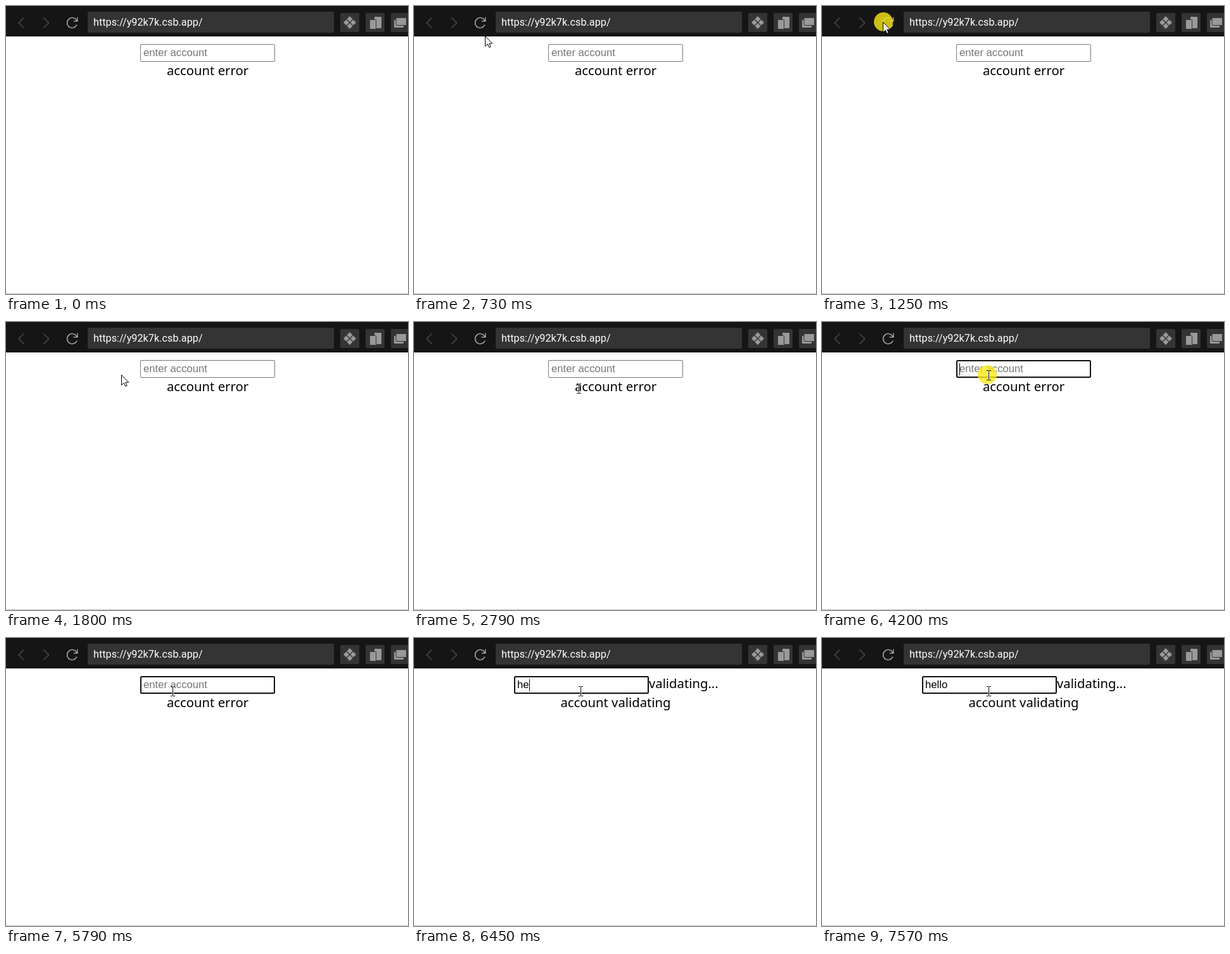
These frames come from a looping animation (635 by 454 pixels, 8 s). An HTML page:

```html
<!DOCTYPE html>
<html lang="en">
<head>
<meta charset="utf-8">
<title>Account validation</title>
<style>
  html, body { margin: 0; width: 100%; height: 100%; overflow: hidden; background: #fff; }
  svg { display: block; }
  .label { font: 20.25px "Noto Sans", sans-serif; }
  .field { font: 16.667px "Liberation Sans", Arial, sans-serif; }
  .url { font: 16.25px Roboto, sans-serif; fill: #fff; }
  .line { fill: none; stroke-width: 1.3; }
</style>
</head>
<body>
<svg width="635" height="454" viewBox="0 0 635 454">
  <rect width="635" height="454" fill="#fff"/>

  <g id="page">
    <g id="input">
      <rect id="border" fill="#fff" rx="1.5"/>
      <text id="value" class="field" x="5" y="79"></text>
      <rect id="caret" y="65" width="1" height="19"/>
    </g>
    <text id="side" class="label" x="371" y="79"></text>
    <text id="status" class="label" x="318.5" y="109" text-anchor="middle"></text>
  </g>

  <rect width="635" height="48" fill="#151515"/>
  <path class="line" stroke="#505050" d="M28 18.5L20 26.5L28 34.5M59.5 18.5L67.5 26.5L59.5 34.5"/>
  <path class="line" stroke="#b4b4b4" d="M112 23.5A8 8 0 1 0 112 29.5M112.8 17.5V23.8H106.5"/>
  <g fill="#343434">
    <rect x="129" y="9" width="389" height="33" rx="2"/>
    <rect x="528" y="11" width="30" height="30" rx="2"/>
    <rect x="568" y="11" width="30" height="30" rx="2"/>
    <rect x="608" y="11" width="30" height="30" rx="2"/>
  </g>
  <text class="url" x="138" y="31">https://y92k7k.csb.app/</text>
  <g fill="#999">
    <path d="M543 16l4.5 4.5l-4.5 4.5l-4.5-4.5zM543 27l4.5 4.5l-4.5 4.5l-4.5-4.5zM537.5 21.5l4.5 4.5l-4.5 4.5l-4.5-4.5zM548.5 21.5l4.5 4.5l-4.5 4.5l-4.5-4.5z"/>
    <rect x="582" y="17" width="11" height="18" rx="1"/>
    <rect x="574.5" y="21.5" width="10" height="15" rx="1" stroke="#343434"/>
    <rect x="613" y="22" width="15" height="12" rx="1"/>
    <rect x="616" y="18.5" width="16.5" height="12" rx="1" stroke="#343434"/>
  </g>

  <rect y="453" width="635" height="1" fill="#c4c4c4"/>

  <circle id="press" r="15" fill="#f9e916" opacity=".8"/>
  <path id="arrow" d="M.5.5V16.5L4.3 13L6.8 18.4L9.2 17.4L6.8 12.1H11.7Z" fill="#fff" stroke="#000"/>
  <g id="beam" fill="none">
    <path d="M.5-7V7" stroke="#fff" stroke-width="3" opacity=".7"/>
    <path d="M-3-7.5H0M1-7.5H4M.5-7V7M-3 7.5H0M1 7.5H4" stroke="#000"/>
  </g>
</svg>

<script>
const LOOP = 8000, TICK = 66.5, BLINK = 530;
const ENTER = 260, RELOAD = 1930, LOADED = 2790, HOVER = 4000, FOCUS = 4200;
const TYPE_START = 6320, TYPE_GAP = 130, TYPE_END = 7040;
const WORD = 'hello';

// Key points of the pointer: time, x, y
const arrowPath = [
  [260, 552, 440], [390, 313, 202], [600, 185, 117], [730, 112, 47], [990, 96, 25],
  [1450, 96, 25], [1650, 125, 50], [1800, 184, 84], [2060, 258, 104]
];
const beamPath = [[3190, 260, 105], [3320, 263, 89], [3930, 263, 89], [3990, 263, 84]];
const presses = [[1250, 1390], [3590, 3650], [4140, 4340]];

const el = id => document.getElementById(id);
const show = (id, on) => el(id).setAttribute('visibility', on ? 'visible' : 'hidden');
const move = (id, x, y) => el(id).setAttribute('transform', `translate(${x} ${y})`);
const set = (id, attrs) => Object.entries(attrs).forEach(([k, v]) => el(id).setAttribute(k, v));

function pointOn(path, t) {
  const time = Math.floor((t + 10) / TICK) * TICK;
  const next = path.findIndex(key => key[0] > time);
  if (next === 0) return path[0].slice(1);
  if (next < 0) return path[path.length - 1].slice(1);
  const a = path[next - 1], b = path[next];
  const k = (time - a[0]) / (b[0] - a[0]);
  return [1, 2].map(i => Math.round(a[i] + (b[i] - a[i]) * k));
}

function typedCount(t) {
  if (t < TYPE_START) return 0;
  if (t >= TYPE_END) return WORD.length;
  return Math.min(WORD.length - 1, 1 + Math.floor((t - TYPE_START) / TYPE_GAP));
}

// The caret blink restarts with every key press.
function caretVisible(t, count) {
  const lastKey = count === 0 ? FOCUS
    : count === WORD.length ? TYPE_END
    : TYPE_START + (count - 1) * TYPE_GAP;
  return t >= FOCUS && (t - lastKey) % (2 * BLINK) < BLINK;
}

function drawPage(t) {
  const count = typedCount(t);
  const text = WORD.slice(0, count);
  const focused = t >= FOCUS;
  const w = focused ? 2 : 1;
  const visible = t < RELOAD || t >= LOADED;
  show('page', visible);
  move('input', text ? 158 : 212, 0);
  set('border', {
    x: w / 2, y: 60 + w / 2, width: 213 - w, height: 28 - w,
    'stroke-width': w,
    stroke: focused ? '#101010' : t >= HOVER ? '#4f4f4f' : '#767676'
  });
  el('value').textContent = text || 'enter account';
  set('value', { fill: text ? '#000' : '#757575' });
  const textWidth = text ? el('value').getComputedTextLength() : 0;
  set('caret', { x: Math.round(5 + textWidth) });
  show('caret', visible && caretVisible(t, count));
  el('side').textContent = text ? 'validating...' : '';
  el('status').textContent = text ? 'account validating' : 'account error';
}

function drawPointer(t) {
  const isBeam = t >= LOADED;
  const [x, y] = pointOn(isBeam ? beamPath : arrowPath, t);
  show('arrow', t >= ENTER && !isBeam);
  show('beam', isBeam);
  show('press', presses.some(([from, to]) => t >= from && t < to));
  move(isBeam ? 'beam' : 'arrow', x, y);
  if (isBeam) move('press', x - 2, y - 1);
  else move('press', x + 1, y);
}

function frame(now) {
  const t = now % LOOP;
  drawPage(t);
  drawPointer(t);
  requestAnimationFrame(frame);
}
frame(performance.now());
</script>
</body>
</html>
```
